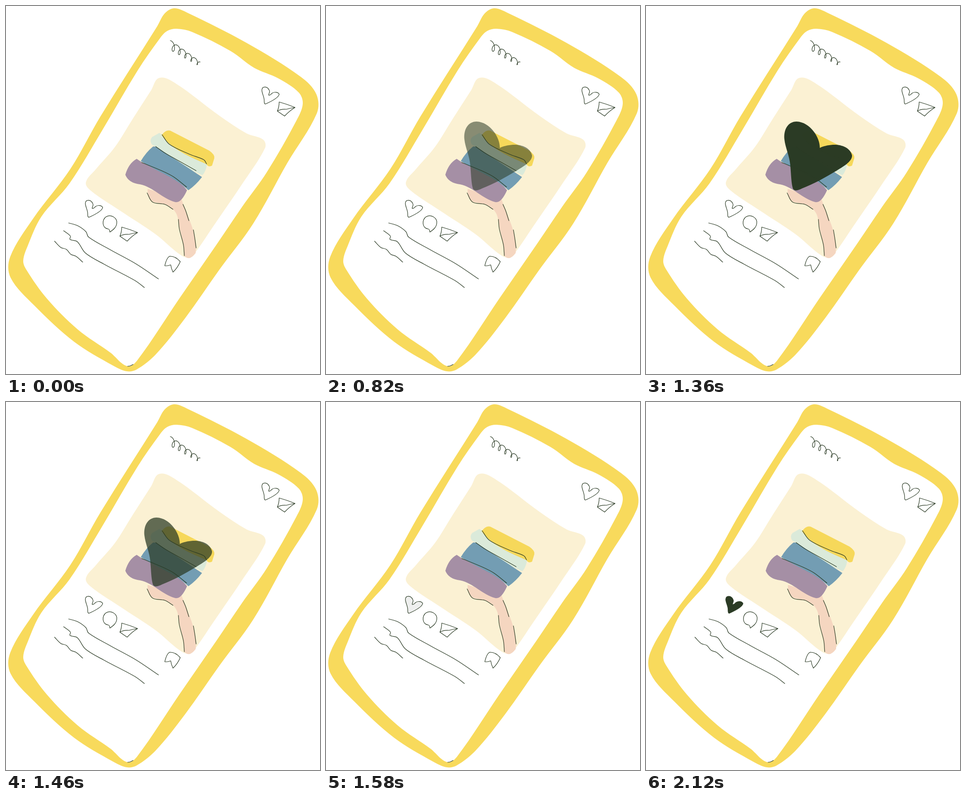
Write an HTML page with a canvas that moves like this. It is 692 px wide and 809 px high and loops after 4.57 s.

```html
<!DOCTYPE html>
<html lang="en">
<head>
<meta charset="utf-8">
<title>Phone post</title>
<style>
html, body { margin: 0; width: 100%; height: 100%; overflow: hidden; background: #fff; }
canvas { display: block; }
</style>
</head>
<body>
<canvas id="stage" width="692" height="809"></canvas>
<script>
const ctx = document.getElementById('stage').getContext('2d');
const LOOP = 4570;
const INK = '#2b3b25';
const YELLOW = '#f8da5c';

// Smooth curve through key points; handles follow each segment's own length
function smooth(text, closed) {
  const p = text.trim().split(/\s+/).map(s => s.split(',').map(Number));
  const n = p.length;
  const at = i => closed ? p[(i + n) % n] : p[Math.max(0, Math.min(n - 1, i))];
  const dir = i => {
    const [a, b] = [at(i - 1), at(i + 1)];
    const len = Math.hypot(b[0] - a[0], b[1] - a[1]) || 1;
    return [(b[0] - a[0]) / len, (b[1] - a[1]) / len];
  };
  const path = new Path2D();
  path.moveTo(...p[0]);
  for (let i = 0; i < (closed ? n : n - 1); i++) {
    const [a, b, u, v] = [at(i), at(i + 1), dir(i), dir(i + 1)];
    const h = Math.hypot(b[0] - a[0], b[1] - a[1]) / 3;
    path.bezierCurveTo(a[0] + u[0] * h, a[1] + u[1] * h, b[0] - v[0] * h, b[1] - v[1] * h, ...b);
  }
  if (closed) path.closePath();
  return path;
}
const blob = text => smooth(text, true);
const line = text => smooth(text, false);

// Looping scribble along a slanted baseline
function scribble(x, y, w, h, turns) {
  const path = new Path2D();
  for (let i = 0; i <= 120; i++) {
    const u = i / 120, a = u * turns * 2 * Math.PI, r = 10 - 5 * u;
    path.lineTo(x + w * u + r * 0.6 * Math.sin(a), y + h * u - r * Math.cos(a));
  }
  return path;
}

const body = blob(`333,45 350,16 371,5 400,15 530,81 650,156 684,194 685,236 620,345 545,478
  470,580 395,686 330,766 288,799 266,803 235,790 150,738 62,658 10,597 9,552 60,467 142,358 208,243`);
const screen = blob(`340,70 355,55 376,50 410,57 495,99 547,136 600,159 645,190 654,215 640,252
  575,365 520,442 465,523 382,643 290,778 268,792 230,762 158,711 90,643 45,580 38,560 48,527
  78,463 140,390 214,270 290,142`);
const card = blob(`320,185 338,158 375,171 470,241 530,280 567,294 571,312 520,392 455,487
  420,538 404,553 383,546 330,502 250,449 187,406 176,388 197,360 240,310 280,247`);

const layers = [
  ['#f5d6c0', `M312 402Q311 432 333 432C352 437 378 441 380 475C385 500 392 520 393 549
    Q404 562 418 543C423 500 398 460 387 425Z`],
  ['#a58fa5', `M288 336L300 344C340 364 368 366 399 405Q386 434 373 431
    C345 424 325 398 295 392Q270 389 263 371Q270 346 288 336Z`],
  ['#dbeada', `M338 279L346 284C365 315 420 337 443 347Q441 363 433 372
    C400 358 350 328 330 309L322 305Q315 296 322 288Z`],
  ['#739db3', `M324 309Q330 308 335 312L432 376Q418 394 402 405C370 375 340 368 297 341
    Q309 321 324 309Z`],
  ['#f6d85a', `M343 284Q352 271 362 274L448 318Q461 327 459 335L454 351Q446 355 442 348
    C420 337 365 318 343 284Z`]
].map(([color, d]) => [color, new Path2D(d)]);

const strokes = [
  '344,283 360,304 405,326 436,338 442,347',
  '330,309 350,323 380,340 419,362',
  '299,344 345,363 370,376 398,398',
  '311,411 323,431 350,436 368,447',
  '380,469 382,490 391,525 393,549',
  '390,436 396,450 403,472',
  '413,492 416,510 419,532',
  '138,477 158,483 176,496 182,508 230,536 285,566 336,600',
  '127,494 142,506 141,513 157,518 175,543 215,567 285,604 305,619',
  '107,517 121,531 133,535 143,546 154,550 169,563',
  '268,792 274,791 280,788'
].map(line);
strokes.push(scribble(362, 86, 66, 42, 5));

const heart = new Path2D(`M16 8C19 12 14 17 15 19C18 20 20 17 22 15C27 11 36 12 38 17
  C37 24 20 33 9 38C5 40 5 34 5 30C5 22-1 13 0 7C1-1 12-1 16 8Z`);
const letter = new Path2D(`M4 0Q22 5 39 12Q26 20 16 31L0 20Q4 11 4 0ZM0 20Q8 15 20 16Q30 13 39 12`);
const bubble = new Path2D(`M225 490C212 489 210 470 221 463C233 457 246 467 244 478
  C243 487 236 492 229 497C228 494 229 491 225 490Z`);
const bookmark = new Path2D(`M350 571Q354 553 361 550Q374 550 384 562Q378 576 368 585
  Q364 577 363 569Q355 572 350 571Z`);
const bigHeart = new Path2D(`M383 312C384 290 362 255 332 254C312 254 303 273 305 293
  C307 312 316 328 318 350C320 372 320 390 324 402C328 408 336 405 344 401
  C370 391 395 377 420 362C440 350 455 340 454 328C450 311 430 304 412 305
  C400 306 391 308 383 312Z`);

const clamp = v => Math.max(0, Math.min(1, v));
const ramp = (t, from, to) => clamp((t - from) / (to - from));

function fill(path, color, alpha = 1) {
  ctx.globalAlpha = alpha;
  ctx.fillStyle = color;
  ctx.fill(path);
  ctx.globalAlpha = 1;
}

function placed(x, y, draw) {
  ctx.save();
  ctx.translate(x, y);
  draw();
  ctx.restore();
}

function bigAlpha(t) {
  if (t < 700) return 0;
  if (t < 1360) return ramp(t, 664, 950);
  return 1 - ramp(t, 1345, 1570) ** 2;
}

function render(t) {
  const liked = ramp(t, 1535, 2120);
  ctx.fillStyle = '#fff';
  ctx.fillRect(0, 0, 692, 809);
  fill(body, YELLOW);
  fill(screen, '#fff');
  fill(card, '#fbf1d3');

  // The drawing drifts a little while the like fills in
  placed(0.8 * liked, 0, () => {
    layers.forEach(([color, path]) => fill(path, color));
    ctx.strokeStyle = INK;
    ctx.lineWidth = 1.2;
    ctx.lineCap = ctx.lineJoin = 'round';
    strokes.forEach(path => ctx.stroke(path));
    placed(175, 426, () => {
      fill(heart, INK, liked);
      ctx.stroke(heart);
    });
    placed(564, 177, () => ctx.stroke(heart));
    placed(598, 211, () => ctx.stroke(letter));
    placed(251, 486, () => ctx.stroke(letter));
    ctx.stroke(bubble);
    ctx.stroke(bookmark);
  });
  fill(bigHeart, INK, bigAlpha(t));
}

const start = performance.now();
function tick() {
  render((performance.now() - start) % LOOP);
  requestAnimationFrame(tick);
}
tick();
</script>
</body>
</html>
```
